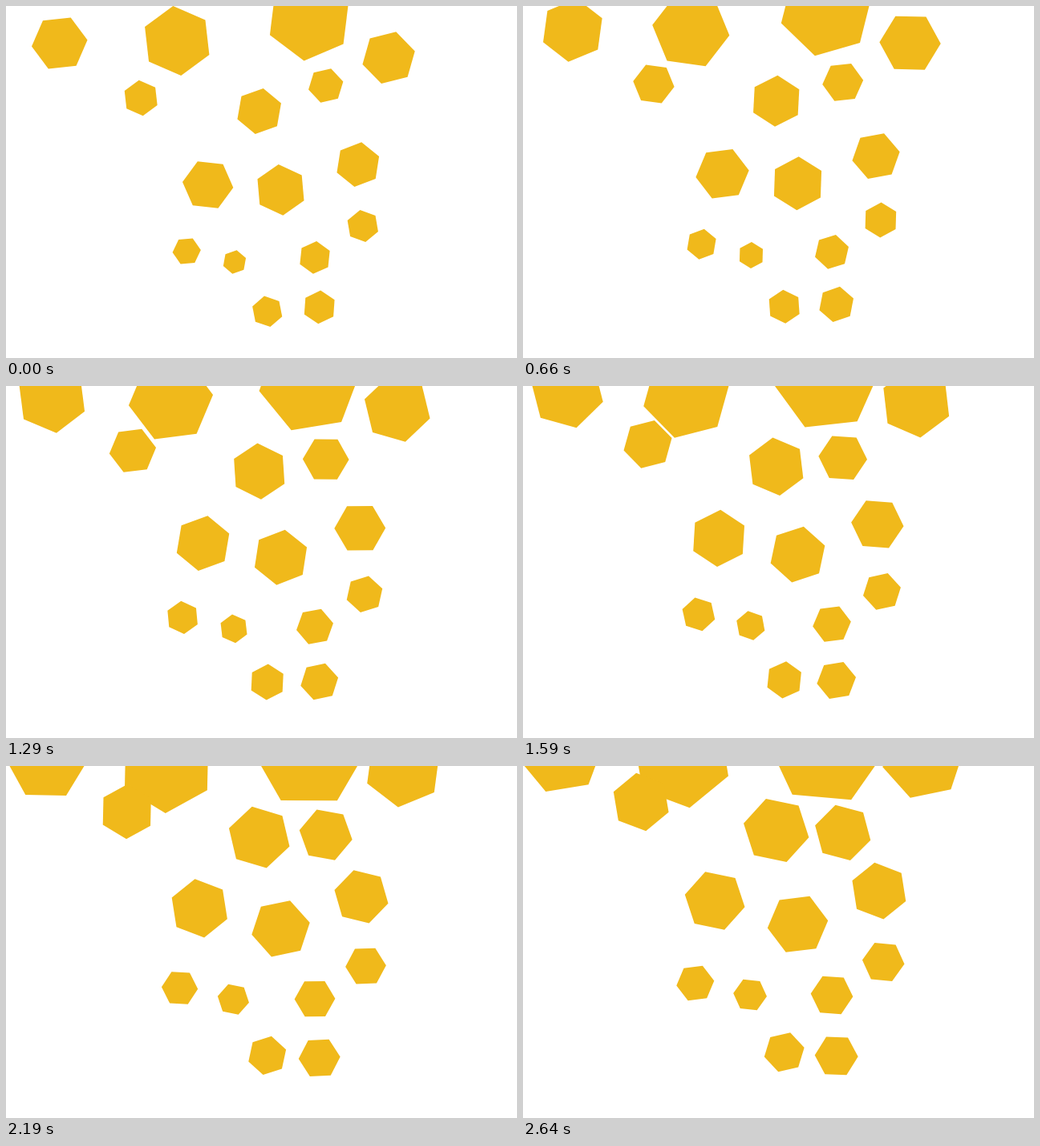
An HTML page with a canvas that plays this animation: 637 px wide and 440 px high, repeating every 2670 ms.

```html
<!DOCTYPE html>
<html lang="en">
<head>
<meta charset="utf-8">
<title>Drifting hexagons</title>
<style>
  html, body { margin: 0; width: 100%; height: 100%; overflow: hidden; background: #fff; }
  canvas { display: block; }
</style>
</head>
<body>
<canvas id="stage" width="637" height="440"></canvas>
<script>
const LOOP = 2670, STEP = 30, LAST_STEP = LOOP / STEP - 1;
const AXIS = 355;
const ctx = document.getElementById("stage").getContext("2d");

// Pose halfway through the loop: x, y, radius, angle in degrees, and the climb over one loop
const hexagons = [
  [57, 14, 44.5, -38, 65], [205.3, 17, 53.2, -8, 53], [378, -4.5, 63.5, 51, 40], [488, 27.7, 42.7, 17, 74],
  [157.7, 80, 29.5, -8, 70], [315.7, 106, 35.3, -34, 51], [398.7, 91.4, 29, 1, 16], [245.4, 196, 35, -21, 55],
  [342.5, 213.8, 35, 39, 32], [441.3, 177.2, 32, 0, 42], [447, 260, 23.4, 43, 30], [220, 289, 20.7, -36, 35],
  [284, 303, 18, -37, 34], [385, 300.4, 23.4, -10, 28], [325.7, 369.8, 22.6, 33, 24], [390.7, 369.4, 24, -12, 14]
];

function smoothstep(from, to, value) {
  const t = Math.min(1, Math.max(0, (value - from) / (to - from)));
  return t * t * (3 - 2 * t);
}

function addHexagon(x, y, radius, degrees) {
  for (let i = 0; i < 6; i++) {
    const angle = (degrees + i * 60) * Math.PI / 180;
    ctx.lineTo(x + radius * Math.cos(angle), y + radius * Math.sin(angle));
  }
  ctx.closePath();
}

// Hexagons away from the axis fan outwards and spin faster; high ones grow faster
function addDrifting([x, y, radius, angle, climb], phase) {
  const spread = smoothstep(45, 140, Math.abs(x - AXIS));
  const sway = Math.sign(x - AXIS) * 0.3 * spread * climb;
  const growth = 6 + Math.max(0, 14 - 0.07 * y);
  const spin = (x < 320 ? -1 : 1) * (28 + 35 * spread);
  addHexagon(x + sway * phase, y - climb * phase, radius + growth * phase, angle + spin * phase);
}

function draw() {
  const elapsed = (performance.now() - origin) % LOOP;
  const phase = Math.floor(elapsed / STEP) / LAST_STEP - 0.5;
  ctx.clearRect(0, 0, 637, 440);
  ctx.fillStyle = "#f0b91b";
  for (const hexagon of hexagons) {
    ctx.beginPath();
    addDrifting(hexagon, phase);
    ctx.fill();
  }
  requestAnimationFrame(draw);
}

const origin = performance.now();
draw();
</script>
</body>
</html>
```
